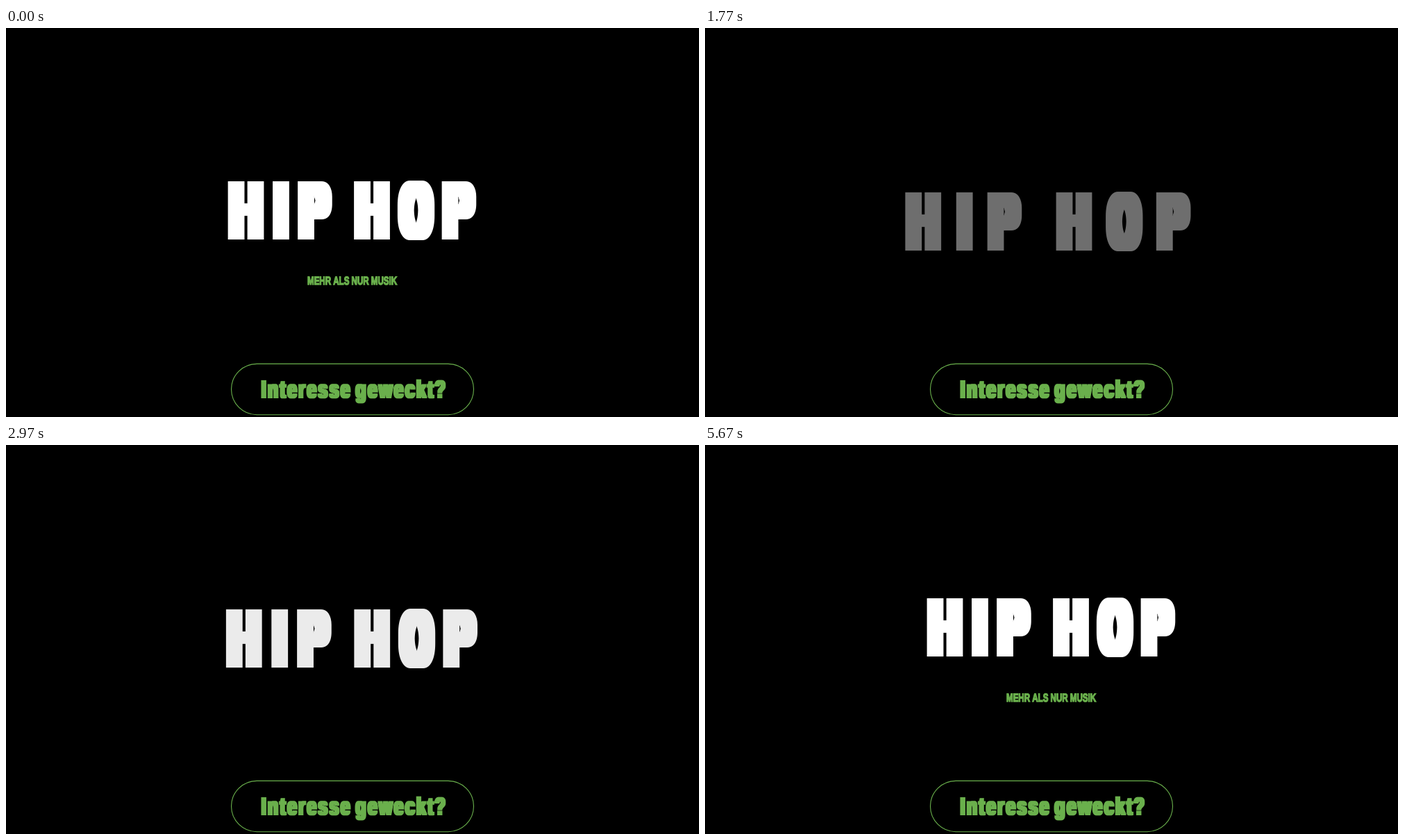
An HTML page that plays this animation: 998x561 px, repeating every 5730 ms.

```html
<!DOCTYPE html>
<html lang="de">
<head>
<meta charset="utf-8">
<title>Hip Hop</title>
<style>
  html, body { margin: 0; width: 100%; height: 100%; overflow: hidden; background: #000; }
  svg { display: block; width: 998px; height: 561px; }
  text {
    font-family: "Liberation Sans", Arial, sans-serif;
    font-weight: 700;
    font-kerning: none;
    text-rendering: geometricPrecision;
    white-space: pre;
  }
  #title { font-family: Roboto, "Liberation Sans", sans-serif; font-weight: 400; text-anchor: middle; }
  .green { fill: #6ab04c; }
</style>
</head>
<body>
<svg viewBox="0 0 998 561">
  <defs>
    <!-- these thicken the stems into a heavy poster face -->
    <filter id="heavy" filterUnits="userSpaceOnUse" x="260" y="190" width="480" height="160"
            color-interpolation-filters="sRGB">
      <feMorphology operator="dilate" radius="9 5"/>
    </filter>
    <filter id="bold" filterUnits="userSpaceOnUse" x="340" y="490" width="320" height="66"
            color-interpolation-filters="sRGB">
      <feMorphology operator="dilate" radius="2 1"/>
    </filter>
  </defs>
  <rect width="998" height="561"/>
  <g id="subtitle">
    <text class="green" transform="translate(434 369.7) scale(.705 1)" font-size="16.4"
          stroke="#6ab04c" stroke-width="1.5" stroke-miterlimit="3">MEHR ALS NUR MUSIK</text>
  </g>
  <rect id="cover" y="200" width="998"/>
  <g filter="url(#heavy)">
    <text id="title" transform="scale(.595 1)" font-size="104">HIP HOP</text>
  </g>
  <rect x="324.5" y="484.4" width="349" height="73.3" rx="36.6" fill="none"
        stroke="#6ab04c" stroke-width="1.1"/>
  <g filter="url(#bold)">
    <text class="green" transform="translate(367.8 533) scale(.7 1)" font-size="35"
          letter-spacing="3.57" word-spacing="-5.1">Interesse geweckt?</text>
  </g>
</svg>
<script>
  const LOOP = 5730, START = 990, LENGTH = 3000;
  const SPREAD = 9, RISE = 16, CONDENSE = 0.595;
  const centers = [345.5, 396, 443.5, 485, 527, 590.5, 651];
  const byId = id => document.getElementById(id);
  const title = byId("title"), subtitle = byId("subtitle"), cover = byId("cover");

  const clamp = v => Math.min(1, Math.max(0, v));
  const bezier = (a, b, u) => 3 * a * u * (1 - u) ** 2 + 3 * b * u * u * (1 - u) + u ** 3;

  // cubic-bezier(.25, .1, .25, 1)
  function ease(x) {
    if (x <= 0 || x >= 1) return clamp(x);
    let lo = 0, hi = 1;
    for (let i = 0; i < 24; i++) {
      const mid = (lo + hi) / 2;
      if (bezier(0.25, 0.25, mid) < x) lo = mid; else hi = mid;
    }
    return bezier(0.1, 1, lo);
  }

  const segment = (p, from, to) => ease(clamp((p - from) / (to - from)));

  function draw(time) {
    // at rest before and after the intro
    const p = time < START ? 1 : clamp((time - START) / LENGTH);
    const spacing = SPREAD * (segment(p, 0, 0.3) - segment(p, 0.3, 0.85));
    const lift = RISE * segment(p, 0.85, 1);
    const shade = Math.round(255 * ease(p));
    const xs = centers.map((c, i) => (c + (i - 3.5) * spacing) / CONDENSE);

    title.setAttribute("x", xs.map(x => x.toFixed(2)).join(" "));
    title.setAttribute("y", 316 - lift);
    title.setAttribute("fill", `rgb(${shade},${shade},${shade})`);
    subtitle.setAttribute("transform", `translate(0 ${lift - RISE})`);
    cover.setAttribute("height", 158 - lift);
  }

  function tick() {
    draw(performance.now() % LOOP);
    requestAnimationFrame(tick);
  }
  tick();
</script>
</body>
</html>
```
